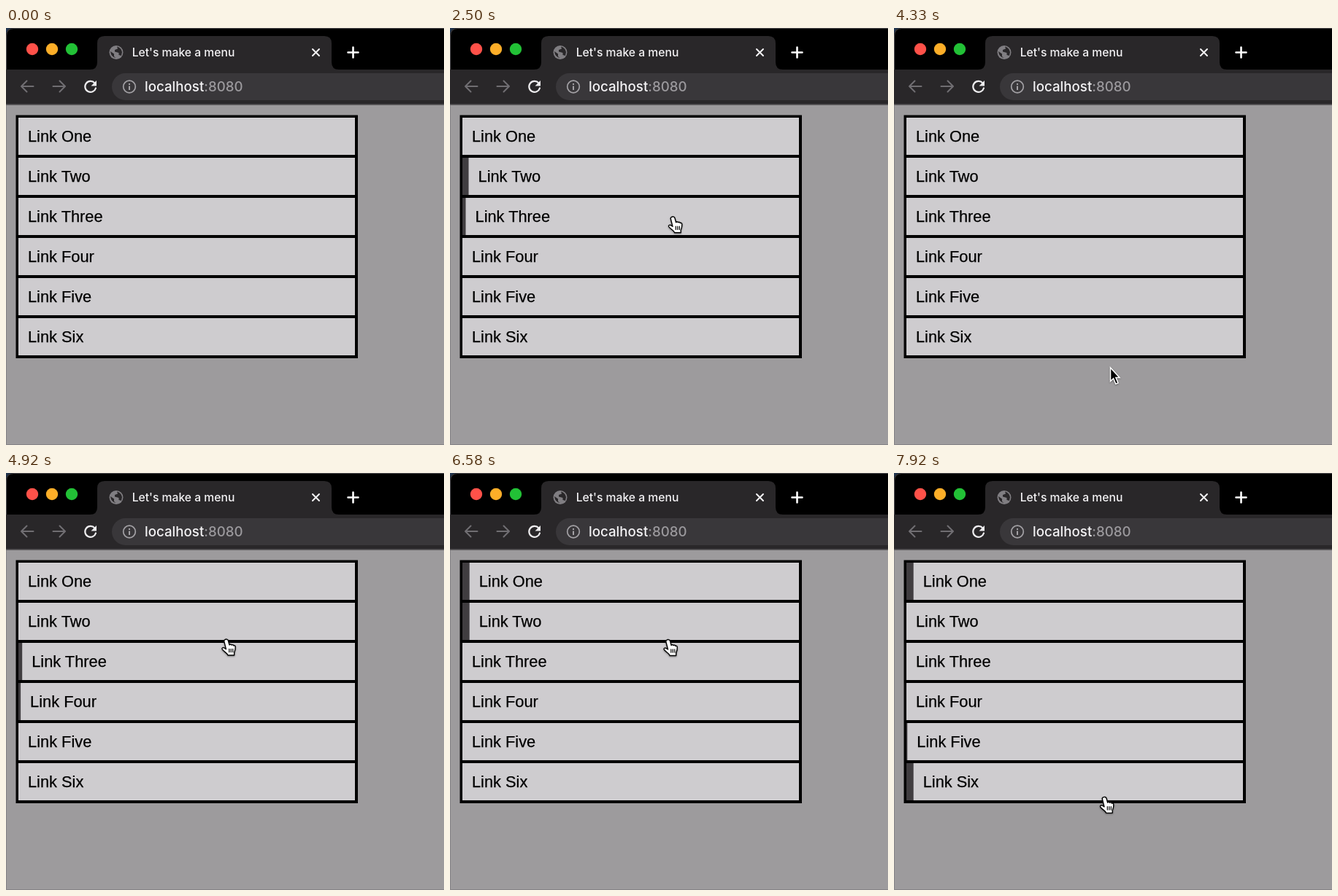
These frames come from a looping animation (600x572 px, 8000 ms). An HTML page:

```html
<!DOCTYPE html>
<html lang="en">
<head>
<meta charset="utf-8">
<title>Menu hover</title>
<style>
  html, body { margin: 0; width: 100%; height: 100%; overflow: hidden; background: #9d9b9d; }
  svg { display: block; }
  .ui { font-family: Inter, Roboto, sans-serif; font-weight: 500; fill: #f3f2f4; }
  .item { font: 21.8px "Liberation Sans", Arial, sans-serif; stroke: #000; stroke-width: .25; }
  .line { fill: none; stroke-linecap: round; stroke-linejoin: round; }
  #cursor { filter: drop-shadow(0 1px 1px #0006); }
</style>
</head>
<body>
<svg width="600" height="572" viewBox="0 0 600 572" stroke-width="2">
  <!-- browser window -->
  <rect width="600" height="110" fill="#23364f"/>
  <path d="M0 110V11Q0 0 11 0H600V110Z"/>
  <path d="M.5 57V11Q.5 .5 11 .5H600" fill="none" stroke="#4b494d" stroke-width="1"/>
  <path d="M0 57H115Q125 57 125 47V21Q125 11 135 11H436Q446 11 446 21V47Q446 57 456 57H600V105H0Z" fill="#292729"/>
  <rect y="104" width="600" height="1.5" fill="#49474a"/>
  <circle cx="36" cy="29" r="8.2" fill="#ff5149"/>
  <circle cx="63" cy="29" r="8.2" fill="#fdae28"/>
  <circle cx="90" cy="29" r="8.2" fill="#22c136"/>
  <circle cx="151" cy="33.5" r="9.5" fill="#807e82"/>
  <path d="M143 32L148 35.5V39L150.5 41Q144 40 143 32ZM152 25.5Q158 27 159 33L158 38L154.5 37V34L149 32.5V30L153 28.5Z" fill="#292729"/>
  <text class="ui" x="172.7" y="39" font-size="15.7">Let's make a menu</text>
  <path class="line" stroke="#f3f2f4" d="M420 29L429 38M429 29L420 38"/>
  <path class="line" stroke="#fff" stroke-width="2.6" d="M468.5 33.5H482.5M475.5 26.5V40.5"/>
  <path class="line" stroke="#706e72" d="M37.5 80H21.5M28.5 72.5L21 80L28.5 87.5M64.5 80H80.5M73.500 72.500L81 80L73.500 87.500"/>
  <path class="line" stroke="#eeedef" stroke-width="2.2" d="M121.500 75.500A7.500 7.500 0 1 0 123 82.500"/>
  <path d="M124 72V79.500H116.500Z" fill="#eeedef"/>
  <path d="M600 62H163.500A18.500 18.500 0 0 0 163.500 99H600Z" fill="#39373a"/>
  <circle class="line" cx="169" cy="80.500" r="8.300" stroke="#a3a1a5" stroke-width="1.700"/>
  <path d="M168 76H170V78H168ZM168 79.500H170V85H168Z" fill="#a3a1a5"/>
  <text class="ui" x="190" y="87" font-size="18.700">localhost<tspan fill="#9b999d">:8080</tspan></text>
  <!-- page -->
  <rect y="105.500" width="600" height="467" fill="#9d9b9d"/>
  <path d="M.5 106V571.500H600" fill="none" stroke="#858386" stroke-width="1"/>
  <rect x="13.500" y="119.500" width="468.500" height="333.500"/>
  <g id="menu"></g>
  <g id="cursor">
    <g id="hand" stroke="#000" stroke-width="1.400" stroke-linejoin="round" stroke-linecap="round" transform="translate(-1 -.5)">
      <path fill="#fff" d="M-1.500 .8C0-.2 2.400 .3 3 2.200L4.600 8C5.500 7 7 7 7.600 8.300C8.600 7.400 10 7.800 10.300 9C11.500 8.400 12.800 9.200 12.800 11C13 14.500 12 16.500 11.200 18.500V22.300H2.600C2 19.500-3.500 17-5.300 14C-6.200 12.300-4.200 11-2.300 12.200L0 13.800L-2.500 4C-3 2.500-2.600 1.300-1.500 .8Z"/>
      <path fill="none" stroke-width="1.200" d="M4.300 13.500V18M6.800 13.500V18M9.300 13.500V18"/>
    </g>
    <path id="arrow" stroke="#fff" stroke-width="1.500" d="M.5 .5V19L4.600 15.200L7.800 22.800L11 21.400L7.900 14H13Z"/>
  </g>
</svg>
<script>
const DURATION = 8000, FPS = 12;
const ENTER = 250, LEAVE = 500, CLICK = 5500;
const TOP = 123, PITCH = 55, LEFT = 17, TEXT_X = 30, SHIFT = 9.7;

// pointer stops: time, x, y
const stops = [
  [330, 582, 147], [1000, 328, 153], [1835, 328, 153], [2380, 309, 229],
  [2500, 306, 259], [3100, 299, 339], [3250, 297, 365], [3500, 297, 426],
  [3900, 295, 497], [4340, 296, 465], [5100, 304.5, 153], [5500, 304, 161],
  [6170, 304, 161], [7000, 295, 297], [7545, 291, 394], [7920, 289, 445]
];

const $ = id => document.getElementById(id);

function add(parent, tag, attrs) {
  const el = document.createElementNS("http://www.w3.org/2000/svg", tag);
  for (const key in attrs) el.setAttribute(key, attrs[key]);
  return parent.appendChild(el);
}

function pointer(t) {
  const i = stops.findIndex(s => s[0] > t);
  if (i === 0) return null;
  if (i < 0) return stops.at(-1).slice(1);
  const a = stops[i - 1], b = stops[i], k = (t - a[0]) / (b[0] - a[0]);
  return [1, 2].map(n => a[n] + (b[n] - a[n]) * k);
}

function rowAt(p) {
  return p && p[0] < 482 ? Math.floor((p[1] - TOP + 4) / PITCH) : -1;
}

// times during which the pointer rests on an item; a click keeps the first lit
function hoverSpans(row) {
  const spans = [];
  let was = false;
  for (let t = 0; t <= DURATION; t += 5) {
    const on = rowAt(pointer(t)) === row || (row === 0 && t > CLICK);
    if (on && !was) spans.push([t, Infinity]);
    if (was && !on) spans.at(-1)[1] = t;
    was = on;
  }
  return spans;
}

const rows = ["One", "Two", "Three", "Four", "Five", "Six"].map((name, i) => {
  const box = { x: LEFT, y: TOP + PITCH * i, height: 51 };
  add($("menu"), "rect", { ...box, width: 461, fill: "#cecccf" });
  const bar = add($("menu"), "rect", { ...box, fill: "#403d40" });
  const label = add($("menu"), "text", { class: "item", y: box.y + 33 });
  label.textContent = "Link " + name;
  return { bar, label, spans: hoverSpans(i) };
});

// close to CSS ease-in-out
function ease(p) {
  p = Math.min(1, Math.max(0, p));
  const a = p ** 1.72, b = (1 - p) ** 1.72;
  return a / (a + b);
}

// a hover cut short also fades back sooner
function hover(t, [start, end]) {
  if (t <= start) return 0;
  const peak = ease((Math.min(t, end) - start) / ENTER);
  return t <= end ? peak : peak * (1 - ease((t - end) / (LEAVE * peak)));
}

function draw(t) {
  for (const { bar, label, spans } of rows) {
    const shift = SHIFT * Math.max(...spans.map(s => hover(t, s)));
    bar.setAttribute("width", shift);
    label.setAttribute("x", TEXT_X + shift);
  }
  const p = pointer(t), row = rowAt(p), over = row >= 0 && row < rows.length;
  $("cursor").style.display = p ? "" : "none";
  if (p) $("cursor").setAttribute("transform", `translate(${p})`);
  $("hand").style.display = over ? "" : "none";
  $("arrow").style.display = over ? "none" : "";
}

const began = performance.now();
function tick() {
  const t = performance.now() - began;
  // the picture advances in steps of a twelfth of a second
  const step = Math.floor((t + 7) * FPS / 1000) % (DURATION * FPS / 1000);
  draw(step * 1000 / FPS);
  requestAnimationFrame(tick);
}
tick();
</script>
</body>
</html>
```
